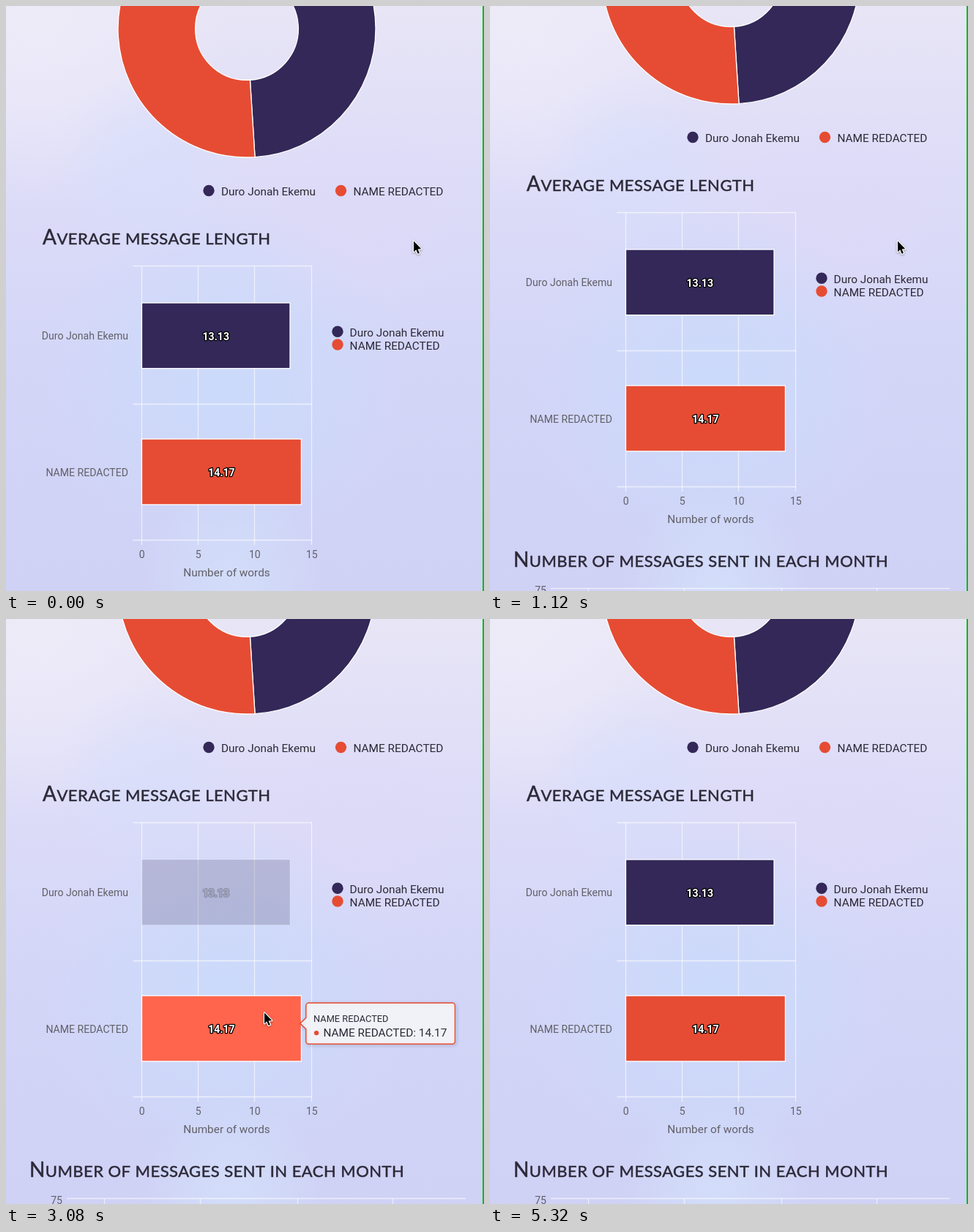
An HTML page with a canvas that plays this animation: 653 px wide and 800 px high, repeating every 5.39 s.

```html
<!DOCTYPE html>
<html lang="en">
<head>
<meta charset="utf-8">
<title>Message statistics</title>
<style>
html, body { margin: 0; width: 653px; height: 800px; overflow: hidden; }
canvas { display: block; }
</style>
</head>
<body>
<canvas id="stage" width="653" height="800"></canvas>
<script>
const ctx = document.getElementById('stage').getContext('2d');
const W = 653, H = 800, LOOP = 5390, TICK = 70;
const SANS = 'Roboto, Arial, sans-serif';
const INK = '#2c2938', GREY = '#626069', NAVY = '#332858', RED = '#e64c33';
const LINE = 'rgba(255,255,255,0.62)';

// Moments when the pointer enters each bar and leaves the chart
const ENTER_A = 1880, ENTER_B = 2930, LEAVE = 4760;

const people = [
  { name: 'Duro Jonah Ekemu', value: '13.13', color: NAVY, hover: '#4c4171', y: 406, right: 388 },
  { name: 'NAME REDACTED', value: '14.17', color: RED, hover: '#ff654c', y: 592.2, right: 403.4 }
];

const clamp = v => Math.max(0, Math.min(1, v));
const ramp = (t, a, b) => clamp((t - a) / (b - a));
const smooth = u => u * u * (3 - 2 * u);
const mix = (a, b, u) => a + (b - a) * u;

function text(s, x, y, size, color, align = 'left', weight = 400) {
  ctx.font = `${weight} ${size}px ${SANS}`;
  ctx.textAlign = align;
  ctx.fillStyle = color;
  ctx.fillText(s, x, y);
}

function heading(s, x, y) {
  const put = (part, size) => {
    ctx.font = `400 ${size}px Lato, "Open Sans", sans-serif`;
    ctx.fillText(part, x, y);
    ctx.strokeText(part, x, y);
    x += ctx.measureText(part).width;
  };
  ctx.textAlign = 'left';
  ctx.fillStyle = ctx.strokeStyle = INK;
  ctx.lineWidth = 0.5;
  ctx.letterSpacing = '0.46px';
  put(s[0], 28);
  put(s.slice(1).toUpperCase(), 22);
  ctx.letterSpacing = '0px';
}

function line(x1, y1, x2, y2) {
  ctx.beginPath();
  ctx.moveTo(x1, y1);
  ctx.lineTo(x2, y2);
  ctx.strokeStyle = LINE;
  ctx.lineWidth = 1.28;
  ctx.stroke();
}

function dot(x, y, r, color) {
  ctx.beginPath();
  ctx.arc(x, y, r, 0, Math.PI * 2);
  ctx.fillStyle = color;
  ctx.fill();
}

function glow(x, y, r, rgb, alpha) {
  const g = ctx.createRadialGradient(x, y, 0, x, y, r);
  g.addColorStop(0, `rgba(${rgb},${alpha})`);
  g.addColorStop(0.5, `rgba(${rgb},${alpha * 0.6})`);
  g.addColorStop(1, `rgba(${rgb},0)`);
  ctx.fillStyle = g;
  ctx.fillRect(0, 0, W, H);
}

function background() {
  const g = ctx.createLinearGradient(0, 0, 0, H);
  g.addColorStop(0, '#e8e5f6');
  g.addColorStop(0.3, '#dddcf8');
  g.addColorStop(0.6, '#d4d6f8');
  g.addColorStop(1, '#cfd1f5');
  ctx.fillStyle = g;
  ctx.fillRect(0, 0, W, H);
  glow(40, 20, 260, '241,238,250', 0.7);
  glow(190, 220, 130, '214,223,252', 0.6);
  glow(300, 520, 250, '202,219,251', 0.85);
  glow(310, 790, 130, '212,226,251', 0.7);
  glow(480, 290, 150, '222,217,247', 0.5);
}

function slice(from, to, color) {
  ctx.beginPath();
  ctx.arc(329, 31, 176, from, to);
  ctx.arc(329, 31, 70.4, to, from, true);
  ctx.closePath();
  ctx.fillStyle = color;
  ctx.fill();
  ctx.strokeStyle = '#fff';
  ctx.lineWidth = 1.28;
  ctx.stroke();
}

function donut() {
  const top = -Math.PI / 2, cut = Math.PI / 2 - 0.063;
  slice(top, cut, NAVY);
  slice(cut, top + Math.PI * 2, RED);
  [[277, 294], [457.5, 474.5]].forEach(([cx, tx], i) => {
    dot(cx, 252.5, 7.68, people[i].color);
    text(people[i].name, tx, 258.6, 15.36, INK);
  });
}

function bar(p, alpha, hot) {
  const w = p.right - 185.5, mid = p.y + 45;
  ctx.globalAlpha = alpha;
  ctx.fillStyle = hot ? p.hover : p.color;
  ctx.fillRect(185.5, p.y, w, 89.6);
  ctx.strokeStyle = '#fff';
  ctx.lineWidth = 1.28;
  ctx.strokeRect(185.5, p.y, w, 89.6);
  ctx.font = `700 14.08px ${SANS}`;
  ctx.textAlign = 'center';
  ctx.lineJoin = 'round';
  ctx.lineWidth = 2.56;
  ctx.strokeStyle = '#000';
  ctx.strokeText(p.value, 185.5 + w / 2, mid + 6);
  text(p.value, 185.5 + w / 2, mid + 6, 14.08, '#fff', 'center', 700);
  ctx.globalAlpha = 1;
}

function lengthChart(t) {
  heading('Average message length', 50, 326);
  [185.5, 262.5, 339.5, 417.5].forEach((x, i) => {
    line(x, 355.5, x, 737);
    text(String(i * 5), x + 0.3, 755, 14.08, GREY, 'center');
  });
  [355.5, 544.5, 730.5].forEach(y => line(173.5, y, 418, y));
  text('Number of words', 301.5, 779.5, 15.36, GREY, 'center');

  const active = t < ENTER_A || t >= LEAVE ? -1 : t < ENTER_B ? 0 : 1;
  const back = ramp(t, LEAVE, LEAVE + 200);
  const fadeA = ramp(t, ENTER_B, ENTER_B + 60) * (1 - back);
  const fadeB = ramp(t, ENTER_A, ENTER_A + 60) * (1 - ramp(t, ENTER_B, ENTER_B + 60));
  bar(people[0], 1 - 0.8 * fadeA, active === 0);
  bar(people[1], 1 - 0.8 * fadeB, active === 1);

  people.forEach((p, i) => {
    text(p.name, 167, 455.8 + i * 187.2, 14.08, GREY, 'right');
    dot(453, 445.3 + i * 17.7, 7.68, p.color);
    text(p.name, 469.6, 451.5 + i * 18, 15.36, INK);
  });
}

function monthChart() {
  heading('Number of messages sent in each month', 32, 839.5);
  line(83, 869.5, 628, 869.5);
  [134, 265, 398, 528].forEach(x => line(x + 0.5, 869.5, x + 0.5, 900));
  text('75', 77, 877, 14.08, GREY, 'right');
}

function tooltip(t) {
  const alpha = 1 - ramp(t, LEAVE + 380, LEAVE + 540);
  if (t < ENTER_A || alpha <= 0) return;
  const p = people[t < ENTER_B ? 0 : 1];
  const n = Math.max(0, t - ENTER_B) / 32;
  const tip = mix(404.2, 388.8, Math.pow(2 / 3, n));
  const mid = mix(560.3, 374.2, Math.pow(1 / 2, n));
  const body = p.name + ': ' + p.value;
  ctx.font = `400 15.36px ${SANS}`;
  const x = tip + 8, y = mid - 28, h = 56, r = 3.84;
  const w = ctx.measureText(body).width + 34.5;

  ctx.save();
  ctx.globalAlpha = alpha;
  ctx.strokeStyle = p.color;
  ctx.lineWidth = 1.28;
  ctx.beginPath();
  ctx.moveTo(x + r, y);
  ctx.arcTo(x + w, y, x + w, y + h, r);
  ctx.arcTo(x + w, y + h, x, y + h, r);
  ctx.arcTo(x, y + h, x, y, r);
  ctx.lineTo(x, mid + 7.7);
  ctx.lineTo(tip, mid);
  ctx.lineTo(x, mid - 7.7);
  ctx.arcTo(x, y, x + w, y, r);
  ctx.closePath();
  ctx.save();
  ctx.shadowColor = 'rgba(0,0,0,0.4)';
  ctx.shadowBlur = 4;
  ctx.shadowOffsetX = ctx.shadowOffsetY = 1.3;
  ctx.stroke();
  ctx.restore();
  ctx.fillStyle = 'rgba(247,247,247,0.85)';
  ctx.fill();
  ctx.stroke();
  text(p.name, x + 10.2, y + 25.6, 12.8, INK);
  dot(x + 14.2, y + 41, 3.2, p.color);
  text(body, x + 23.5, y + 45.5, 15.36, INK);
  ctx.restore();
}

// Pointer stops: start time, end time, x, y
const stops = [
  [1400, 2100, 340, 388],
  [2450, 3080, 352, 537],
  [3080, 3300, 352, 539],
  [4550, 5040, 680, 500]
];

function pointer(t) {
  let x = 556, y = 320;
  for (const [a, b, px, py] of stops) {
    const u = smooth(ramp(t, a, b));
    x = mix(x, px, u);
    y = mix(y, py, u);
  }
  ctx.save();
  ctx.translate(x, y);
  ctx.beginPath();
  [[1, 1.5], [1, 16.2], [4.3, 13.2], [6.6, 18.8], [8.9, 17.9], [6.6, 12.4], [11.2, 12.1]]
    .forEach(([px, py]) => ctx.lineTo(px, py));
  ctx.closePath();
  ctx.lineJoin = 'round';
  ctx.lineWidth = 2.4;
  ctx.strokeStyle = '#fff';
  ctx.shadowColor = 'rgba(0,0,0,0.35)';
  ctx.shadowBlur = 3;
  ctx.shadowOffsetY = 1;
  ctx.stroke();
  ctx.shadowColor = 'transparent';
  ctx.fillStyle = '#000';
  ctx.fill();
  ctx.restore();
}

function draw(t) {
  const scroll = 77 * (1 - Math.exp(-Math.max(0, t - 74) / 354));
  background();
  ctx.save();
  ctx.translate(0, -Math.round(scroll * 2) / 2);
  donut();
  lengthChart(t);
  monthChart();
  ctx.restore();
  tooltip(t);
  pointer(t);
  ctx.fillStyle = '#12b81c';
  ctx.fillRect(W - 2, 0, 2, H);
}

const start = performance.now();
function frame() {
  const t = (performance.now() - start) % LOOP;
  draw(Math.floor(t / TICK) * TICK);
  requestAnimationFrame(frame);
}
frame();
</script>
</body>
</html>
```
